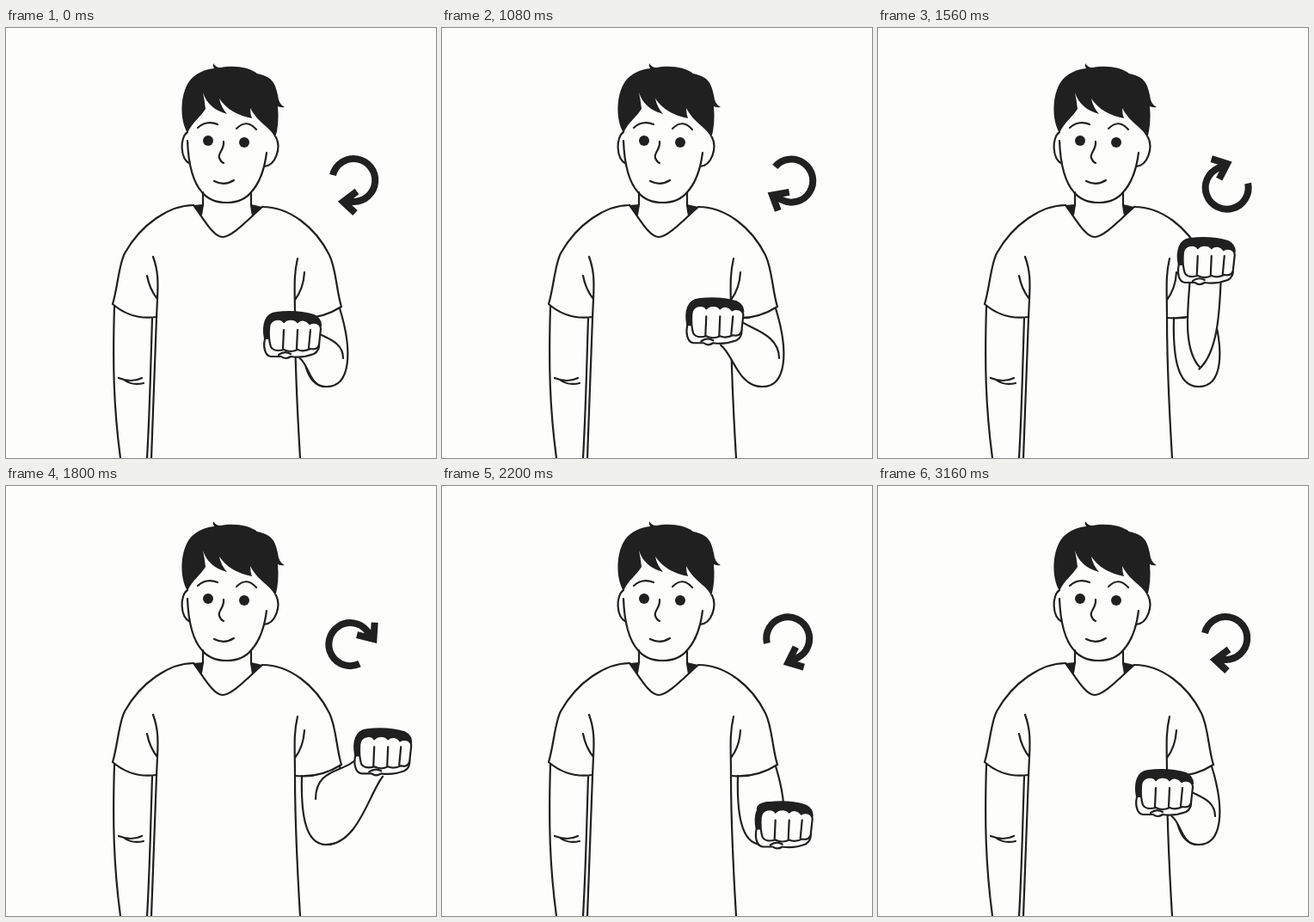
Animation, 500 px wide and 500 px high, one loop 4 s. Source, as an HTML page:

```html
<!DOCTYPE html>
<html lang="en">
<head>
<meta charset="utf-8">
<title>Circling fist</title>
<style>
  html, body { margin: 0; width: 100%; height: 100%; overflow: hidden; background: #fdfdfc; }
  svg { display: block; width: 100vw; height: 100vh; }
  .line { fill: none; stroke: #202020; stroke-width: 2.2; stroke-linecap: round; stroke-linejoin: round; }
  .skin { fill: #fdfdfc; }
  .dark { fill: #202020; }
  .plain { stroke: none; }
</style>
</head>
<body>
<svg viewBox="0 0 500 500">
  <g class="line">
    <!-- head -->
    <path d="M211 121C202 127 202 152 214 158M314 127C320 139 314 160 300 161"/>
    <path d="M211 131C212 157 217 179 228 191C241 207 272 207 285 191C296 179 301 161 303 145"/>
    <path class="dark plain" d="M211 122C202 107 202 78 213 62C220 53 231 48 242 47Q240 44 241 41Q244 46 249 46C264 43 283 45 292 53C311 57 313 65 316 78Q317 89 324 92Q320 93 316 91Q318 112 313 128C308 115 294 112 284 93Q284 100 286 105Q260 100 248 82Q250 92 257 100Q235 94 229 75Q231 84 232 94C226 104 217 109 211 122Z"/>
    <circle class="dark plain" cx="235" cy="131" r="6"/>
    <circle class="dark plain" cx="277" cy="133" r="6"/>
    <path d="M223 116Q233 107 246 112M268 117Q280 105 291 118M253 132C254 142 246 145 248 151Q250 156 253 157M242 178Q254 184 265 177"/>
    <!-- neck and collar -->
    <path class="dark plain" d="M218 206L229 205L227 218ZM285 205L298 208L287 219Z"/>
    <path d="M229 191V205L227 217M285 191V206L287 218M218 206C230 222 241 243 252 243C263 243 282 222 298 208"/>
    <!-- shirt and resting arm -->
    <path d="M218 206C190 206 157 228 138 262C131 276 130 301 124 321Q146 340 175 336"/>
    <path d="M171 266C177 282 177 296 176 315L175 337L169 500M164 288Q167 304 176 315"/>
    <path d="M126 324C124 390 125 440 133 500M170 338C168 400 167 450 164 500M131 407Q146 413 158 407M137 409Q146 416 160 413"/>
    <path d="M298 208C330 208 360 232 376 264C384 280 384 305 390 324"/>
    <path d="M339 268C334 290 336 305 336 337C336 400 339 450 342 500M347 284Q346 303 336 316"/>
    <!-- moving arm -->
    <path class="skin" d="M344 337C343 375 346 417 372 417C400 418 404 378 388 326"/>
    <path d="M390 324Q365 340 336 337"/>
    <path id="forearm" class="skin plain"/>
    <path id="edges"/>
    <!-- fist, around its own centre -->
    <g id="fist" class="skin">
      <path d="M-31 1C-35 13-32 24-25 25H-13Q-8 29-2 25Q12 27 25 22Q32 18 31 9Z"/>
      <path class="dark" d="M-32 4C-35-12-31-25-19-26C-3-28 12-27 25-23Q33-19 33-11L-25-10L-28 4Z"/>
      <path d="M-27-9C-26-20-13-20-10-15C-6-20 3-19 6-15C10-19 17-18 20-13C25-16 33-14 33-7L31 11Q29 18 21 16Q13 20 6 17Q-2 21-10 17Q-21 20-25 14Q-28 5-27-9Z"/>
      <path d="M-10-6l-1 22M6-6l-1 22M21-6l-2 21M-16 23Q-9 18-2 22"/>
    </g>
  </g>
  <g id="arrow" fill="none" stroke="#202020" stroke-width="8">
    <path d="M380 171A25 25 0 1 1 404 202H392"/>
    <path d="M408 190L392 202L406 215"/>
  </g>
</svg>
<script>
const LOOP = 4000, STEP = 40;
const REST = [333, 357], ORBIT = [380, 340], REST_ANGLE = 160 * Math.PI / 180;
const ELBOW = [376, 385], ELBOW_TIP = [372, 417];
const ARROW_PIVOT = [404, 181.5];

const $ = id => document.getElementById(id);
const clamp = (value, low, high) => Math.min(Math.max(value, low), high);
const mix = (a, b, amount) => a.map((value, i) => value + (b[i] - value) * amount);
const along = (point, vector, length) => point.map((value, i) => value + vector[i] * length);
const cubic = ([a, b, c, d], command) => `${command}${a}C${b} ${c} ${d}`;

// Eased 0 to 1 between two times.
function ramp(time, from, to) {
  const u = clamp((time - from) / (to - from), 0, 1);
  return u * u * (3 - 2 * u);
}

// One clockwise turn, wider at the top, leaving and rejoining the rest point.
function fistAt(time) {
  const angle = REST_ANGLE + 2 * Math.PI * ramp(time, 790, 2870);
  const radius = 63 - 6 * Math.sin(angle);
  const orbit = along(ORBIT, [Math.cos(angle), Math.sin(angle)], radius);
  return mix(REST, orbit, ramp(time, 800, 1100) - ramp(time, 2560, 3040));
}

// Two edges run from the wrist: the outer one to the elbow tip, the inner one to a crease.
function forearmEdges(fist) {
  const dx = ELBOW[0] - fist[0], dy = ELBOW[1] - fist[1], length = Math.hypot(dx, dy);
  const direction = [dx / length, dy / length];
  const normal = [direction[1], -direction[0]];
  const wrist = along(fist, direction, 22);
  const turn = clamp((fist[0] - ORBIT[0]) / 28, -1, 1);
  const crease = [376 - 16 * turn, 374 - 10 * turn];
  const reach = 0.38 * length;
  return [-1, 1].map(side => {
    const outer = (1 + side * turn) / 2;
    const start = along(wrist, normal, 18 * side);
    const end = mix(crease, ELBOW_TIP, outer);
    return [start, along(start, direction, length / 4),
      along(end, [side * outer, outer - 1], reach), end];
  });
}

function draw(time) {
  const fist = fistAt(time);
  const [left, right] = forearmEdges(fist);
  $("edges").setAttribute("d", cubic(left, "M") + cubic(right, "M"));
  $("forearm").setAttribute("d", cubic(left, "M") + cubic([...right].reverse(), "L") + "Z");
  $("fist").setAttribute("transform", `translate(${fist})`);
  $("arrow").setAttribute("transform", `rotate(${360 * ramp(time, 800, 2480)} ${ARROW_PIVOT})`);
}

const start = performance.now();
function tick() {
  const time = (performance.now() - start) % LOOP;
  draw(Math.floor(time / STEP) * STEP);
  requestAnimationFrame(tick);
}
tick();
</script>
</body>
</html>
```
